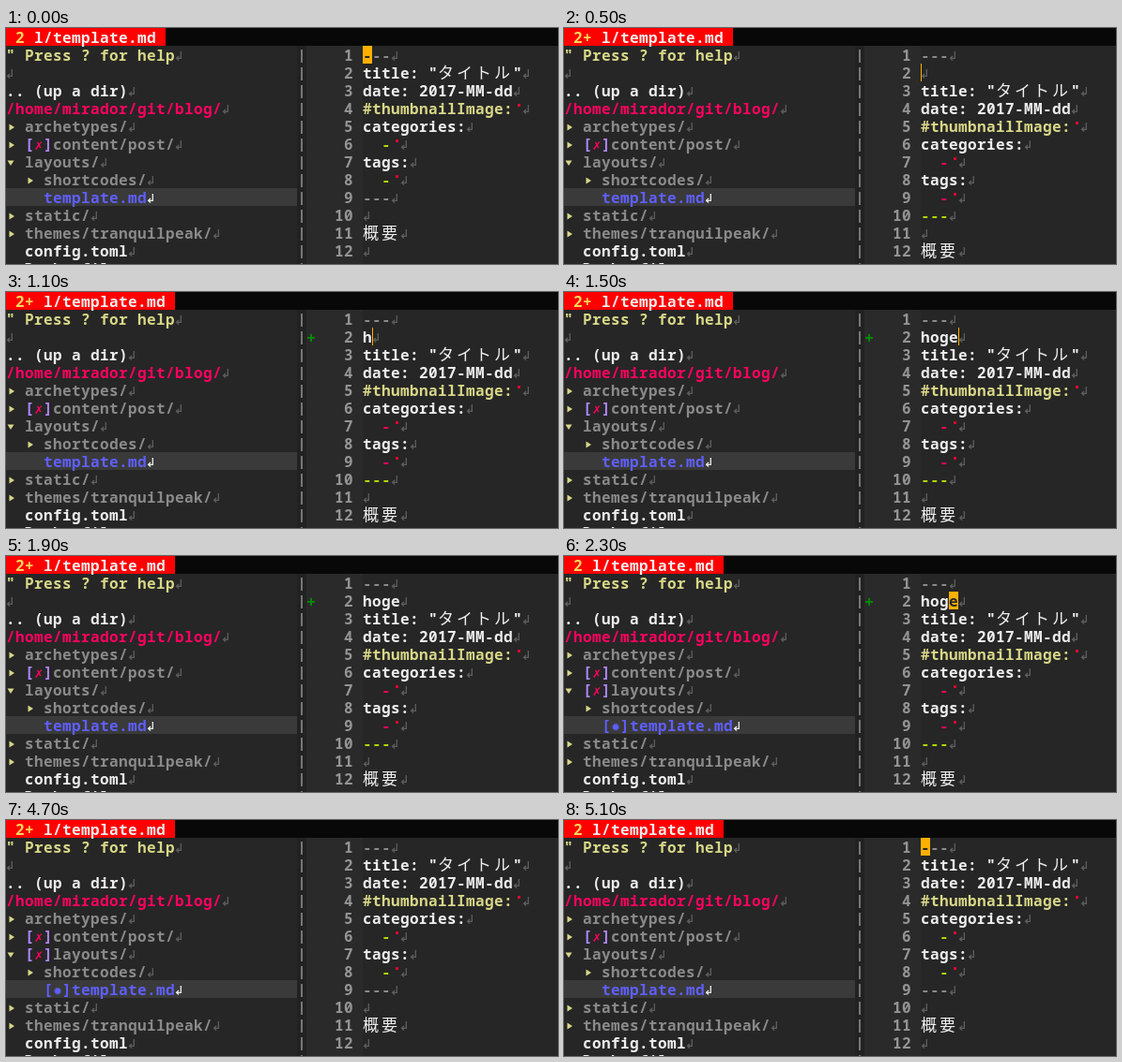
Animation, 588 px wide and 252 px high, one loop 8000 ms. Source, as an HTML page:

```html
<!DOCTYPE html>
<html lang="ja">
<head>
<meta charset="utf-8">
<title>Editor</title>
<style>
  html, body { margin: 0; width: 100%; height: 100%; overflow: hidden; background: #262626; }
  svg { display: block; }
  text { font: 600 16px "Noto Sans Mono", "DejaVu Sans Mono", monospace; letter-spacing: .4px; white-space: pre; font-variant-ligatures: none; }
  .wide { font: 500 17px "Noto Sans CJK JP", "Noto Sans CJK", sans-serif; letter-spacing: 3px; }
  .mark { font: 12px "DejaVu Sans", sans-serif; letter-spacing: 0; text-anchor: middle; }
</style>
</head>
<body>
<svg id="stage" width="588" height="252" viewBox="0 0 588 252"></svg>
<script>
const W = 10, H = 19, LOOP = 8000, CODE = 380;
const C = {
  bg: '#262626', white: '#eeeeee', yellow: '#d7d787', pink: '#ff005f', grey: '#8a8a8a',
  blue: '#5f5fff', purple: '#af87ff', lime: '#afd700', eol: '#5f5f5f', cursor: '#ffaf00'
};
const stage = document.getElementById('stage');

const rect = (x, y, w, h, fill) =>
  `<rect x="${x}" y="${y}" width="${w}" height="${h}" fill="${fill}"/>`;
const text = (x, row, str, fill, cls = '') =>
  `<text class="${cls}" x="${x}" y="${row * H + 16}" fill="${fill}">${str}</text>`;
const shape = (x, row, d, fill) =>
  `<path transform="translate(${x} ${row * H})" d="${d}" fill="${fill}"/>`;
const eol = (x, row, color = C.eol) =>
  `<path transform="translate(${x} ${row * H})" d="M6.3 6V13.3H2M4 11L1.6 13.3L4 15.6" fill="none" stroke="${color}" stroke-width="1.3"/>`;
const closed = (x, row) => shape(x, row, 'M3.5 7.5L9 11L3.5 14.5Z', C.yellow);
const opened = (x, row) => shape(x, row, 'M1.5 8.5H8.5L5 14Z', C.yellow);
const trail = (x, row) => rect(x + 5, row * H + 5, 3, 3, '#e0002f');

// Text followed by its end-of-line sign
const line = (x, row, str, fill, end) =>
  text(x, row, str, fill) + eol(x + str.length * W, row, end);

function flag(x, row, sign, frame, color) {
  return text(x, row, '[', frame) + text(x + 15, row, sign, color, 'mark') + text(x + 20, row, ']', frame);
}

function tabBar(dirty) {
  const x = dirty ? 40 : 30;
  return rect(0, 0, 588, H, '#080808') + rect(0, 0, x + 140, H, '#ff0000') +
    text(10, 0, dirty ? '2+' : '2', '#ffd75f') + text(x, 0, 'l/template.md', C.white);
}

function tree(flagged) {
  const shift = flagged ? 30 : 0;
  let out = rect(0, 9 * H, 310, H, '#3a3a3a') +
    line(0, 1, '" Press ? for help', C.yellow) + eol(0, 2) +
    line(0, 3, '.. (up a dir)', C.white) +
    line(0, 4, '/home/mirador/git/blog/', C.pink) +
    closed(0, 5) + line(20, 5, 'archetypes/', C.grey) +
    closed(0, 6) + flag(20, 6, '✗', C.purple, C.pink) + line(50, 6, 'content/post/', C.grey) +
    opened(0, 7) + line(20 + shift, 7, 'layouts/', C.grey) +
    closed(20, 8) + line(40, 8, 'shortcodes/', C.grey) +
    line(40 + shift, 9, 'template.md', C.blue, C.white) +
    closed(0, 10) + line(20, 10, 'static/', C.grey) +
    closed(0, 11) + line(20, 11, 'themes/tranquilpeak/', C.grey) +
    line(20, 12, 'config.toml', C.white) + text(20, 13, 'Dockerfile', C.white);
  if (flagged) out += flag(20, 7, '✗', C.purple, C.pink) + flag(40, 9, '✹', C.blue, C.blue);
  return out;
}

function editor(typed, sign) {
  const extra = typed !== null;
  const item = row => text(CODE + 20, row, '-', extra ? C.pink : C.lime) +
    trail(CODE + 30, row) + eol(CODE + 40, row);
  const body = [
    row => line(CODE, row, '---', C.grey),
    row => text(CODE, row, 'title: "', C.white) + text(CODE + 80, row, 'タイトル', C.white, 'wide') +
      line(CODE + 160, row, '"', C.white),
    row => line(CODE, row, 'date: 2017-MM-dd', C.white),
    row => text(CODE, row, '#thumbnailImage:', C.yellow) + trail(CODE + 160, row) + eol(CODE + 170, row),
    row => line(CODE, row, 'categories:', C.white),
    item,
    row => line(CODE, row, 'tags:', C.white),
    item,
    row => line(CODE, row, '---', extra ? C.lime : C.grey),
    row => eol(CODE, row),
    row => text(CODE, row, '概要', C.white, 'wide') + eol(CODE + 40, row),
    row => eol(CODE, row)
  ];
  if (extra) body.splice(1, 0, row => line(CODE, row, typed, C.white));

  let out = rect(310, H, 10, 233, '#222222') + rect(320, H, 60, 233, '#2a2a2a');
  for (let row = 1; row <= 13; row++) out += rect(314, row * H + 4, 2, 14, '#767676');
  for (let n = 1; n <= 12; n++) out += text(370 - String(n).length * W, n, n, '#949494');
  body.forEach((draw, i) => { out += draw(i + 1); });
  if (sign) out += rect(321, 48, 8, 2, '#008700') + rect(324, 45, 2, 8, '#008700');
  return out;
}

function cursor(t, typed) {
  const block = (col, row, char) =>
    rect(CODE + col * W, row * H, W, H, C.cursor) + text(CODE + col * W, row, char, C.bg);
  if (t < 500) return block(0, 1, '-');
  if (t < 1700) return rect(CODE + typed.length * W, 2 * H, 1, H, C.cursor);
  if (t < 1900) return block(3, 2, 'e');
  if (t < 2300) return '';
  if (t < 4100) return block(3, 2, 'e');
  if (t >= 4700 && t < 5100) return '';
  return block(0, 1, '-');
}

function typedAt(t) {
  if (t < 500 || t >= 4100) return null;
  return 'hoge'.slice(0, t < 1100 ? 0 : t < 1300 ? 1 : t < 1500 ? 3 : 4);
}

function render(t) {
  const within = (from, to) => t >= from && t < to;
  const typed = typedAt(t);
  return tabBar(within(500, 2300) || within(4100, 5100)) +
    tree(within(2300, 5100)) +
    editor(typed, within(700, 4300)) +
    cursor(t, typed);
}

let shown = '';
const start = performance.now();
function tick() {
  const next = render((performance.now() - start) % LOOP);
  if (next !== shown) stage.innerHTML = shown = next;
  requestAnimationFrame(tick);
}
tick();
</script>
</body>
</html>
```
